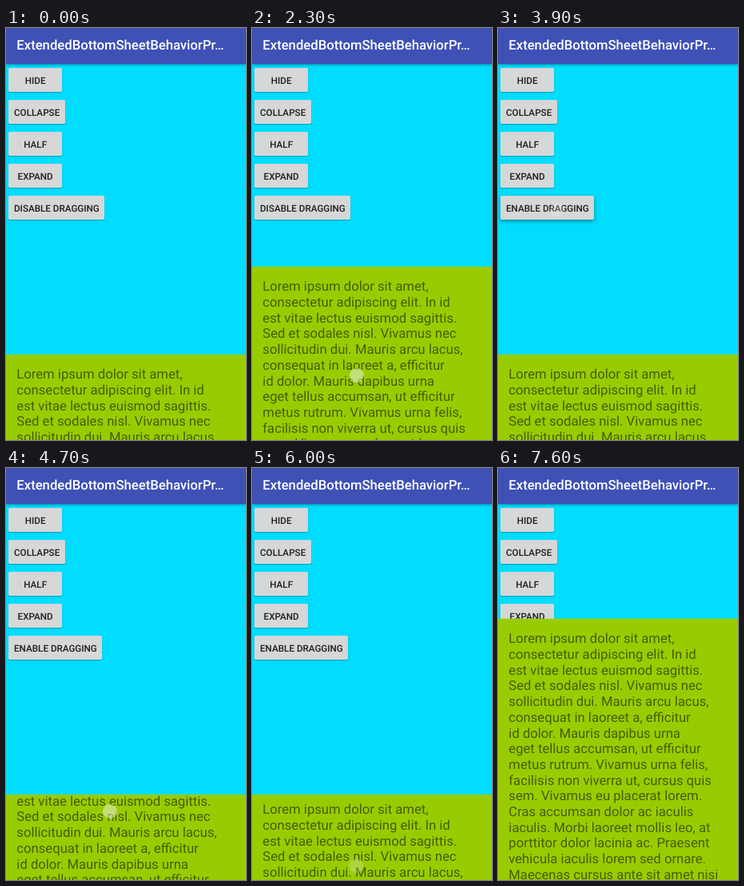
Animation, 300 px wide and 516 px high, one loop 8000 ms. Source, as an HTML page:

```html
<!DOCTYPE html>
<html lang="en">
<head>
<meta charset="utf-8">
<title>Bottom sheet</title>
<style>
  html, body { margin: 0; width: 100%; height: 100%; overflow: hidden; }
  body { font-family: Roboto, sans-serif; text-rendering: geometricPrecision; }
  #stage { position: relative; width: 300px; height: 516px; overflow: hidden; background: #00ddff; }
  #bar {
    position: absolute; left: 0; top: 0; width: 300px; height: 45px;
    box-sizing: border-box; padding-left: 13.33px;
    background: #3f51b5; color: #fff; white-space: nowrap;
    font-size: 16.67px; font-weight: 500; line-height: 46px;
    box-shadow: 0 1px 3px rgba(0, 0, 0, .42);
  }
  .btn {
    position: absolute; left: 3.33px; height: 30px; min-width: 66.67px;
    box-sizing: border-box; padding: 0 6.67px; border-radius: 1.7px;
    background: #d6d7d7; color: rgba(0, 0, 0, .87);
    font-size: 11.67px; font-weight: 500; line-height: 32px;
    text-align: center; white-space: nowrap;
    box-shadow: 0 1px 1.5px rgba(0, 0, 0, .3);
  }
  .btn.raised { box-shadow: 0 2px 4px rgba(0, 0, 0, .42); }
  #sheet { position: absolute; left: 0; top: 0; width: 300px; height: 516px; overflow: hidden; background: #99cc00; }
  #copy {
    position: absolute; left: 13.33px; top: 16.3px; white-space: pre;
    font-size: 16.67px; line-height: 19.7px; color: rgba(0, 0, 0, .54);
  }
  #touch {
    position: absolute; left: -9px; top: -9px; width: 18px; height: 18px;
    border-radius: 50%; background: rgba(240, 240, 240, .74);
  }
</style>
</head>
<body>
<div id="stage">
  <div id="bar">ExtendedBottomSheetBehaviorPr…</div>
  <div id="sheet"><div id="copy">Lorem ipsum dolor sit amet,
consectetur adipiscing elit. In id
est vitae lectus euismod sagittis.
Sed et sodales nisl. Vivamus nec
sollicitudin dui. Mauris arcu lacus,
consequat in laoreet a, efficitur
id dolor. Mauris dapibus urna
eget tellus accumsan, ut efficitur
metus rutrum. Vivamus urna felis,
facilisis non viverra ut, cursus quis
sem. Vivamus eu placerat lorem.
Cras accumsan dolor ac iaculis
iaculis. Morbi laoreet mollis leo, at
porttitor dolor lacinia ac. Praesent
vehicula iaculis lorem sed ornare.
Maecenas cursus ante sit amet nisi</div></div>
  <div id="touch"></div>
</div>
<script>
const LOOP = 8000, STEP = 100, FADE = 300;
const LOW = 409, HALF = 188.7, SCROLLED = 112;
const $ = id => document.getElementById(id);
const stage = $('stage'), sheet = $('sheet'), copy = $('copy'), touch = $('touch');

const buttons = ['HIDE', 'COLLAPSE', 'HALF', 'EXPAND', 'DISABLE DRAGGING'].map((label, i) => {
  const b = document.createElement('div');
  b.className = 'btn';
  b.textContent = label;
  b.style.top = 50 + 40 * i + 'px';
  stage.insertBefore(b, sheet);
  return b;
});
const toggle = buttons[4];
const LOCK = 3900, UNLOCK = 6500;

const sheetMoves = [
  { at: 2000, time: 600, to: HALF },
  { at: 2900, time: 500, to: LOW },
  { at: 6800, time: 700, to: HALF }
];
const scrollMoves = [
  { at: 4200, time: 1000, to: SCROLLED },
  { at: 5400, time: 700, to: 0 }
];

const drag = (at, time, x, y, dy) => ({ at, time, x, y, dy });
const tap = at => drag(at, 0, 74, 228, 0);
const touches = [
  drag(2000, 200, 131, 477, -42),
  drag(2900, 200, 121, 302, 68),
  tap(LOCK - 200),
  drag(4200, 400, 130, 488, -58),
  drag(5400, 400, 130, 434, 64),
  tap(UNLOCK - 200),
  drag(6800, 300, 128, 492, -45)
];

const clamp = v => Math.min(1, Math.max(0, v));
const smooth = v => v * v * (3 - 2 * v);

function glide(moves, value, t) {
  for (const m of moves) value += (m.to - value) * smooth(clamp((t - m.at) / m.time));
  return value;
}

function drawTouch(t) {
  const p = touches.find(p => t >= p.at && t < p.at + p.time + FADE);
  touch.style.opacity = p ? clamp(1 - (t - p.at - p.time) / FADE) : 0;
  if (!p) return;
  const k = p.time ? clamp((t - p.at) / p.time) : 0;
  touch.style.transform = `translate(${p.x}px, ${p.y + p.dy * k * k}px)`;
}

function draw(t) {
  sheet.style.transform = `translateY(${glide(sheetMoves, LOW, t)}px)`;
  copy.style.transform = `translateY(${-glide(scrollMoves, 0, t)}px)`;
  toggle.textContent = t >= LOCK && t < UNLOCK ? 'ENABLE DRAGGING' : 'DISABLE DRAGGING';
  const raised = [LOCK, UNLOCK].some(at => t >= at - STEP && t < at + STEP);
  toggle.classList.toggle('raised', raised);
  drawTouch(t);
}

const begin = performance.now();
function tick() {
  const t = (performance.now() - begin + 4) % LOOP;
  draw(Math.floor(t / STEP) * STEP);
  requestAnimationFrame(tick);
}
tick();
</script>
</body>
</html>
```
